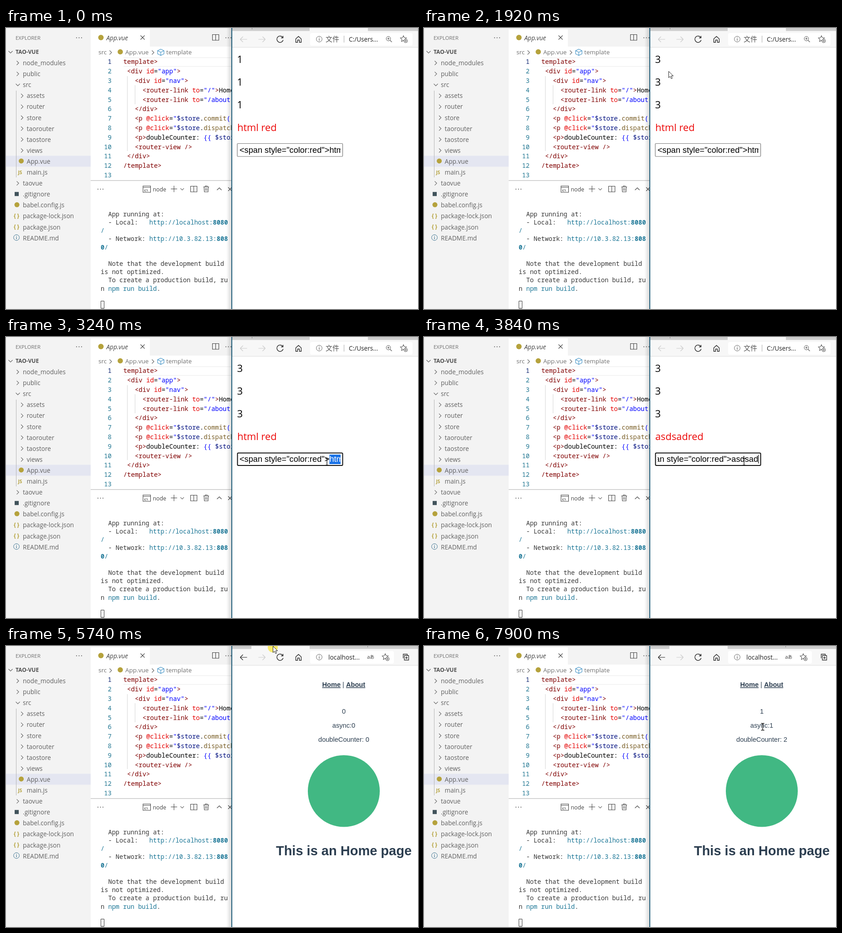
Write an HTML page that moves like this. It is 905 px wide and 619 px high and loops after 8 s.

```html
<!DOCTYPE html>
<html lang="en">
<head>
<meta charset="utf-8">
<title>Editor and browser</title>
<style>
html, body { margin: 0; width: 100%; height: 100%; overflow: hidden; background: #fff; }
svg { display: block; width: 905px; height: 619px; font-family: "Open Sans", "Noto Sans", sans-serif; }
text { white-space: pre; }
.mono { font-family: "Noto Sans Mono", "DejaVu Sans Mono", monospace; }
.arial { font-family: "Liberation Sans", Arial, sans-serif; }
.cjk { font-family: "Noto Sans CJK SC", "Noto Sans CJK", sans-serif; }
.bold { font-weight: 700; }
.italic { font-style: italic; }
.mid { text-anchor: middle; }
.end { text-anchor: end; }
</style>
</head>
<body>
<svg id="stage" viewBox="0 0 905 619"></svg>
<script>
const LOOP = 8000;
const OLIVE = '#b5a23c', GRAY = '#616161', INK = '#2c3e50', TEAL = '#1b7696';

const esc = s => s.replace(/&/g, '&amp;').replace(/</g, '&lt;');
const text = (x, y, s, size, fill, cls = '', extra = '') =>
  `<text x="${x}" y="${y}" font-size="${size}" fill="${fill}" class="${cls}" ${extra}>${esc(s)}</text>`;
const rect = (x, y, w, h, fill, extra = '') =>
  `<rect x="${x}" y="${y}" width="${w}" height="${h}" fill="${fill}" ${extra}/>`;
const path = (d, stroke = '#424242', w = 1.1, extra = '') =>
  `<path d="${d}" fill="none" stroke="${stroke}" stroke-width="${w}" ${extra}/>`;
const dot = (x, y, r, fill, extra = '') => `<circle cx="${x}" cy="${y}" r="${r}" fill="${fill}" ${extra}/>`;
const dots = (x, y) => [0, 5.5, 11].map(d => dot(x + d, y, 1.1, GRAY)).join('');
const right = (x, y) => path(`M${x - 2.5} ${y - 4.5}l4.5 4.5l-4.5 4.5`, GRAY);
const down = (x, y, s = 4.5) => path(`M${x - s} ${y - s / 2}l${s} ${s}l${s} ${-s}`, GRAY);
const cross = (x, y, s = 4.5) => path(`M${x - s} ${y - s}l${2 * s} ${2 * s}m0 ${-2 * s}l${-2 * s} ${2 * s}`);
const split = (x, y) => path(`M${x - 7} ${y - 6}h14v12.5h-14zM${x} ${y - 6}v12.5`);
const info = (x, y, color) =>
  dot(x, y, 6.3, 'none', `stroke="${color}"`) + path(`M${x} ${y - 3.4}v1.5M${x} ${y - 0.8}v4.3`, color, 1.3);

function sidebar() {
  const rows = [
    ['node_modules', 0, '>'], ['public', 0, '>'], ['src', 0, 'v'], ['assets', 1, '>'], ['router', 1, '>'],
    ['store', 1, '>'], ['taorouter', 1, '>'], ['taostore', 1, '>'], ['views', 1, '>'], ['App.vue', 1, 'dot'],
    ['main.js', 1, 'JS'], ['taovue', 0, '>'], ['.gitignore', 0, 'square'], ['babel.config.js', 0, 'dot'],
    ['package-lock.json', 0, '{}'], ['package.json', 0, '{}'], ['README.md', 0, 'i']
  ];
  const icon = {
    '>': (x, y) => right(x + 3, y), 'v': (x, y) => down(x + 3, y), 'dot': (x, y) => dot(x + 1, y - 1, 5.5, OLIVE),
    'JS': (x, y) => text(x - 6, y + 3.5, 'JS', 10, OLIVE, 'bold'), 'square': (x, y) => rect(x - 4, y - 5, 9, 9, '#41535b'),
    '{}': (x, y) => text(x - 6, y + 3.5, '{ }', 11.5, OLIVE, 'bold'), 'i': (x, y) => info(x, y - 1, '#3f7591')
  };
  return rect(0, 0, 186, 619, '#f3f3f3') + rect(0, 281.5, 186, 24, '#e4e6f1')
    + text(21, 26.3, 'EXPLORER', 11.4, '#6f6f6f') + dots(155, 21.5)
    + down(10, 53) + text(21, 57.3, 'TAO-VUE', 12, '#4f4f4f', 'bold')
    + path('M22.5 138V329', '#b4b4b4', 1)
    + rows.map(([name, depth, kind], i) => {
      const y = 77 + 24.1 * i;
      return icon[kind]((depth ? 32.5 : 23), y) + text(depth ? 45.5 : 37, y + 5, name, 13.65, GRAY);
    }).join('');
}

// The first letter of each token picks its colour.
const PAINT = { m: '#800000', r: '#e50000', b: '#0000ff', k: '#000', n: '#001080', f: '#795e26' };
const CODE = [
  [1, 'mtemplate>'],
  [2, 'm<div', 'r id', 'k=', 'b"app"', 'm>'],
  [4, 'm<div', 'r id', 'k=', 'b"nav"', 'm>'],
  [6, 'm<router-link', 'r to', 'k=', 'b"/"', 'm>', 'kHome'],
  [6, 'm<router-link', 'r to', 'k=', 'b"/about"'],
  [4, 'm</div>'],
  [4, 'm<p', 'r @click', 'k=', 'b"', 'n$store', 'k.', 'fcommit', 'b('],
  [4, 'm<p', 'r @click', 'k=', 'b"', 'n$store', 'k.', 'fdispatch'],
  [4, 'm<p>', 'kdoubleCounter: ', 'b{{', 'n $store'],
  [4, 'm<router-view', 'm />'],
  [2, 'm</div>'],
  [1, 'm/template>'],
  [0]
];

function editor() {
  const lines = CODE.map(([col, ...tokens], i) => {
    const y = 79.3 + 20.8 * i;
    const spans = tokens.map(s => `<tspan fill="${PAINT[s[0]]}">${esc(s.slice(1))}</tspan>`).join('');
    return text(232, y, String(i + 1), 14, i ? '#237893' : '#0b216f', 'mono end')
      + `<text x="${249.3 + 8.4 * col}" y="${y}" font-size="14" class="mono">${spans}</text>`;
  }).join('');
  return rect(186, 0, 310, 619, '#fff') + rect(186, 0, 310, 41, '#f3f3f3') + rect(186, 3, 130, 39, '#fff')
    + dot(208.5, 21, 6, OLIVE) + text(220.5, 26.5, 'App.vue', 13.6, '#444', 'italic') + cross(300, 21)
    + split(460.5, 20.5) + dots(483, 21.5)
    + text(203, 58.3, 'src', 13.5, '#6f6f6f') + right(230, 54) + dot(251, 52.5, 5.8, OLIVE)
    + text(262, 58.3, 'App.vue', 13.5, '#6f6f6f') + right(323, 54)
    + path('M333 50l7-3.5l7 3.5v7l-7 3.5l-7-3.5zM333 50l7 3.5l7-3.5M340 53.5v7', '#3b8fc4')
    + text(352, 58.3, 'template', 13.4, '#6f6f6f')
    + path('M258 65.5H496M258 84.5H496', '#eaeaea', 1)
    + path('M266.5 106V271M283.5 126V168', '#d6d6d6', 1) + lines;
}

function terminal() {
  const row = (i, col, s, fill = '#383838', cls = '') =>
    text(208 + 8.22 * col, 414.7 + 18.2 * i, s, 13.7, fill, 'mono ' + cls);
  return path('M186 336H496', '#c4c4c4', 1.4) + dots(202, 355)
    + path('M301 348h16.5v14h-16.5zM301 351h16.5') + text(303.5, 359.5, 'c:\\', 7, '#424242', 'bold')
    + text(322.5, 360, 'node', 12.3, '#424242') + path('M362 354.5h14M369 347.5v14') + down(387, 355, 3.8)
    + split(412.5, 354.5)
    + path('M433.5 350h12.5M437.5 350v-2h4.5v2M435 350l.7 11h8.2l.7-11M438.3 352.5v6M441.3 352.5v6')
    + path('M463.5 357l5-5l5 5') + cross(492, 355, 4)
    + row(0, 2, 'App running at:') + row(1, 2, '- Local:') + row(1, 13, 'http://localhost:', TEAL)
    + row(1, 30, '8080', TEAL, 'bold') + row(2, 0, '/', TEAL)
    + row(3, 2, '- Network:') + row(3, 13, 'http://10.3.82.13:', TEAL) + row(3, 31, '808', TEAL, 'bold')
    + row(4, 0, '0', TEAL, 'bold') + row(4, 1, '/', TEAL)
    + row(6, 2, 'Note that the development build') + row(7, 0, 'is not optimized.')
    + row(8, 2, 'To create a production build, ru') + row(9, 0, 'n') + row(9, 2, 'npm run build', TEAL) + row(9, 15, '.')
    + path('M208.5 601.5h7v16h-7z', '#333', 1);
}

const arrow = (x, dir, color) => path(`M${x - 7.5} 25h15M${x + 7.5 * dir} 25l${-6 * dir} -6m${6 * dir} 6l${-6 * dir} 6`, color, 1.2);

function star(x, y) {
  const points = Array.from({ length: 10 }, (_, i) => {
    const a = -Math.PI / 2 + i * Math.PI / 5, r = i % 2 ? 3.4 : 7;
    return `${(x + r * Math.cos(a)).toFixed(1)} ${(y + r * Math.sin(a)).toFixed(1)}`;
  });
  return path(`M${points.join('L')}z`, '#555') + dot(x + 5, y + 4.5, 3.8, '#fff', 'stroke="#444"')
    + path(`M${x + 3} ${y + 4.5}h4M${x + 5} ${y + 2.5}v4`, '#444', 1);
}

function browser() {
  return rect(484, 0, 12, 619, 'url(#shade)') + rect(497, 0, 408, 619, '#fff') + rect(497, 0, 408, 42, '#f7f7f7')
    + path('M497 42.5H905', '#dedede', 1)
    + path('M608 21a7 7 0 1 0 .8 5.5M608.5 17.5v4.3h-4.3', '#222', 1.4)
    + path('M636.5 24l6-5.5l6 5.5v7.5h-4v-5h-4v5h-4z', '#222', 1.3) + arrow(562, 1, '#cbcbcb');
}

function localPage() {
  return `<g id="local">` + rect(497, 0, 170, 6.5, '#cdcdcd') + rect(795, 0, 110, 6.5, '#cdcdcd')
    + rect(539, 0, 128, 6.5, '#dedede', 'id="hover"') + path('M540.5 0v3', '#8a8a8a', 1)
    + arrow(522, -1, '#cbcbcb') + rect(668, 11, 225, 28, '#fff', 'rx="4"') + info(688, 24.5, '#666')
    + text(702, 30, '文件', 15, '#555', 'cjk') + path('M742.5 17v15', '#aaa', 1)
    + text(753, 29.7, 'C:/Users...', 13.6, '#222')
    + dot(840, 23.5, 4.8, 'none', 'stroke="#555"') + path('M843.5 27l4 4M837.5 23.5h5M840 21v5', '#555') + star(873, 24)
    + [0, 1, 2].map(i => text(507.5, 76.7 + 50.2 * i, '1', 22, '#000', 'count')).join('')
    + text(508, 227, '', 21.8, '#ec0808', '', 'id="result"')
    + `<rect id="box" fill="#fff"/><g clip-path="url(#field)">` + rect(0, 259, 60, 21, '#1a73e8', 'id="selection"')
    + text(0, 275.2, '', 18.2, '#000', 'arial end', 'id="before"') + text(0, 275.2, '', 18.2, '#000', 'arial', 'id="after"')
    + `</g>` + rect(0, 259.5, 1.2, 19, '#000', 'id="caret"') + `</g>`;
}

function homePage() {
  return `<g id="home">` + rect(497, 0, 42, 6.5, '#cdcdcd') + rect(667, 0, 238, 6.5, '#cdcdcd') + path('M794.5 0v3', '#8a8a8a', 1)
    + arrow(522, -1, '#222') + rect(668, 11, 184, 28, '#fff', 'rx="4"') + info(688, 24.5, '#666')
    + text(708, 29.7, 'localhost...', 13.8, '#222') + text(793, 28, 'a', 11.5, '#444') + text(799, 28, 'あ', 10, '#444', 'cjk')
    + star(833, 24) + path('M872.5 27v-9h9v3M875 21h9.5v10h-9.5zM879.7 23.3v5.4M877 26h5.4', '#333', 1.3)
    + text(694.5, 90, 'Home', 14.6, INK, 'arial bold', 'text-decoration="underline"') + text(739, 90, '|', 14.6, INK, 'arial')
    + text(747, 90, 'About', 14.6, INK, 'arial bold', 'text-decoration="underline"')
    + [148.7, 179.5, 210.5].map(y => text(742, y, '', 14.6, INK, 'arial mid store')).join('')
    + dot(742, 319.5, 79, '#41b883') + text(742, 460.5, 'This is an Home page', 29, INK, 'arial bold mid') + `</g>`;
}

const stage = document.getElementById('stage');
stage.innerHTML = `<defs><linearGradient id="shade"><stop stop-color="#000" stop-opacity="0"/>
  <stop offset="1" stop-color="#000" stop-opacity=".16"/></linearGradient>
  <clipPath id="field"><rect x="513" y="256" width="222" height="27"/></clipPath></defs>`
  + sidebar() + editor() + terminal() + browser() + localPage() + homePage() + rect(495, 0, 2, 619, '#225f7b')
  + dot(0, 0, 11, '#fbe63c', 'id="halo" fill-opacity=".75"')
  + `<g id="pointer"><path id="arrow" d="M.5 .5v14l3.3-3l2.3 5.2l2.4-1l-2.3-5.1h4.4z" fill="#fff" stroke="#222"/>
     <g id="beam">${path('M-3.5 -7.5h2.5l1 1l1-1h2.5M0 -6.5v13M-3.5 7.5h2.5l1-1l1 1h2.5', '#111', 1.3)}</g></g>`;

const $ = id => document.getElementById(id);
const all = cls => [...document.getElementsByClassName(cls)];
const set = (id, attrs) => { for (const k in attrs) $(id).setAttribute(k, attrs[k]); };
const show = (id, on) => $(id).setAttribute('visibility', on ? 'inherit' : 'hidden');
const within = (t, spans) => spans.some(([a, b]) => t >= a && t < b);
const latest = (t, steps) => steps.filter(s => s[0] <= t).pop()[1];

const linear = k => k;
const glide = k => k * k * (3 - 2 * k);
const settle = k => 1 - (1 - k) ** 2;
// time, x, y, easing of the way towards this point
const MOVES = [
  [0, 844, 640], [100, 844, 620, linear], [900, 514, 68, glide], [1770, 514, 68], [2450, 700, 284, glide],
  [2670, 700, 284], [2800, 718, 272, settle], [3050, 718, 272], [3300, 703, 275, glide], [4400, 703, 275],
  [4650, 729, 247, glide], [4860, 722, 225, linear], [5190, 602, 24, glide], [5230, 601, 22, linear],
  [5500, 586, 0, settle], [6030, 586, 0], [6580, 739, 144, glide], [7460, 739, 144], [7670, 744, 177, settle],
  [7890, 744, 177], [7900, 744, 178], [LOOP, 744, 178]
];
const BEAM = [[860, 1880], [2700, 4470], [6500, LOOP]];
const CLICKS = [[1030, 1130], [1390, 1490], [2850, 2950], [5640, 5800], [6860, 6960]];
const COUNT = [[0, '1'], [1130, '2'], [1490, '3']];
const TYPED = [[0, ''], [3340, 'a'], [3430, 'as'], [3510, 'asd'], [3610, 'asds'], [3720, 'asdsa'],
  [3800, 'asdsad'], [3940, 'asdsada'], [3970, 'asdsadas']];
const FOCUS = 2850, SELECT = 2950, EDIT = 3340, SWITCH = 5640;

function position(t) {
  const i = Math.max(1, MOVES.findIndex(m => m[0] > t));
  const [t0, x0, y0] = MOVES[i - 1], [t1, x1, y1, ease = linear] = MOVES[i];
  const k = ease((t - t0) / (t1 - t0));
  return [x0 + (x1 - x0) * k, y0 + (y1 - y0) * k];
}

function drawField(t) {
  const typed = latest(t, TYPED), focused = t >= FOCUS, selected = t >= SELECT && t < EDIT;
  const rest = t < EDIT ? 'html red' : 'red';
  $('result').textContent = typed + rest;
  $('before').textContent = '<span style="color:red">' + typed;
  $('after').textContent = rest + '<\/span>';
  const x = Math.min(734, 513 + $('before').getComputedTextLength());
  for (const id of ['before', 'after', 'selection', 'caret']) set(id, { x });
  set('after', { fill: selected ? '#fff' : '#000' });
  show('selection', selected);
  const blinkStart = t < EDIT ? FOCUS : Math.max(...TYPED.map(s => s[0]).filter(s => s <= t));
  show('caret', focused && !selected && Math.floor((t - blinkStart) / 530) % 2 === 0);
  set('box', focused
    ? { x: 508.5, y: 255.5, width: 231, height: 27.5, rx: 2, stroke: '#101010', 'stroke-width': 2 }
    : { x: 508, y: 254.5, width: 231.5, height: 28.5, rx: 1.5, stroke: '#767676', 'stroke-width': 1.2 });
}

function draw(t) {
  const home = t >= SWITCH;
  $('local').style.display = home ? 'none' : '';
  $('home').style.display = home ? '' : 'none';
  if (home) {
    const n = t < 6960 ? 0 : 1;
    all('store').forEach((el, i) => { el.textContent = [n, 'async:' + n, 'doubleCounter: ' + 2 * n][i]; });
  } else {
    all('count').forEach(el => { el.textContent = latest(t, COUNT); });
    show('hover', t >= 5230);
    drawField(t);
  }
  const [x, y] = position(t), beam = within(t, BEAM);
  set('pointer', { transform: `translate(${Math.round(x)} ${Math.round(y)})` });
  show('arrow', !beam);
  show('beam', beam);
  set('halo', { cx: beam ? x - 2 : x, cy: beam ? y - 3 : y + 3 });
  show('halo', within(t, CLICKS));
}

const start = performance.now();
function tick() {
  draw((performance.now() - start) % LOOP);
  requestAnimationFrame(tick);
}
tick();
</script>
</body>
</html>
```
